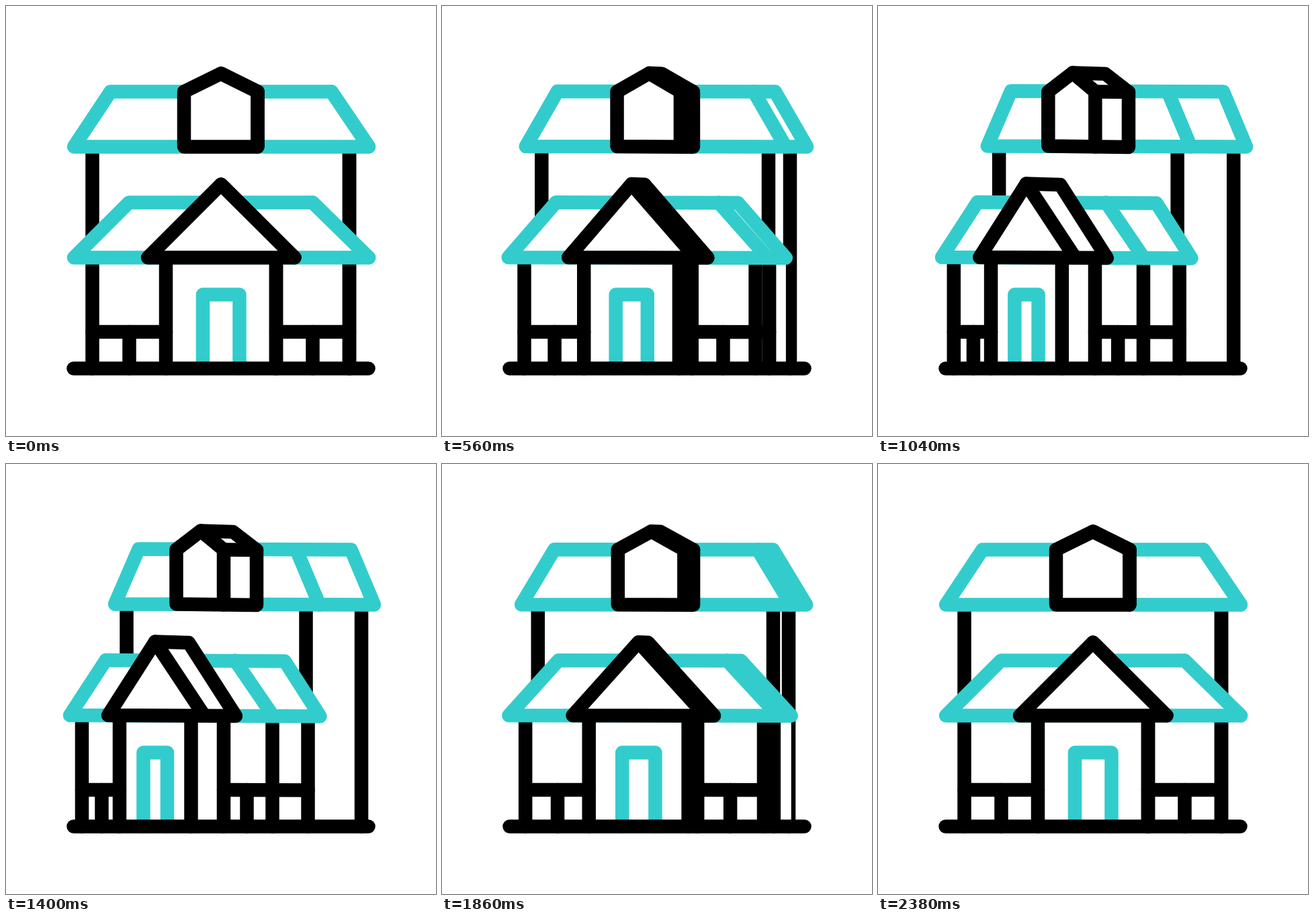
Animation of 640 by 640 pixels, one loop 2400 ms. Source, as an HTML page with a canvas:

```html
<!DOCTYPE html>
<html lang="en">
<head>
<meta charset="utf-8">
<title>Turning house</title>
<style>
  html, body { margin: 0; width: 100%; height: 100%; overflow: hidden; background: #fff; }
  canvas { display: block; }
</style>
</head>
<body>
<canvas id="stage" width="640" height="640"></canvas>
<script>
const ctx = document.getElementById('stage').getContext('2d');
const TEAL = '#33cccc', BLACK = '#000';
const LOOP = 2400, HALF = 1190;
const FLOOR = 539.5, EAVES = 374.5, RAIL = 485;
let turn = 0;

// Symmetric ease: time runs along a cubic with handles A and B
function ease(x) {
  const A = 0.765, B = 0.24;
  let lo = 0, hi = 1;
  for (let i = 0; i < 30; i++) {
    const s = (lo + hi) / 2, r = 1 - s;
    if (3 * s * r * r * A + 3 * s * s * r * B + s ** 3 < x) lo = s; else hi = s;
  }
  return lo * lo * (3 - 2 * lo);
}

// A point of the front view and its shift when the house turns
const pt = (x, y, dx = 0, dy = 0) => [x + dx * turn, y + dy * turn];

function trace(points) {
  ctx.beginPath();
  points.forEach(p => ctx.lineTo(...p));
}

function line(color, ...points) {
  trace(points);
  ctx.strokeStyle = color;
  ctx.stroke();
}

function shape(color, ...points) {
  trace(points);
  ctx.closePath();
  ctx.fill();
  ctx.strokeStyle = color;
  ctx.stroke();
}

const post = (x, dx, top, bottom = FLOOR) =>
  line(BLACK, pt(x, top, dx), pt(x, bottom, dx));

function upperFloor() {
  post(128.5, 51, 209.5, EAVES);
  post(511, -64.5, 209.5, EAVES);
  post(511, 18, 209.5);

  shape(TEAL, pt(101, 209.5, 61, -1), pt(155.5, 127.5, 42, -1),
    pt(484.5, 127.5, 29), pt(540, 209.5, 8));
  line(TEAL, pt(484.5, 127.5, -52.5), pt(540, 209.5, -73.5));

  const apex = pt(320, 100.5, -30, -1), backApex = pt(320, 100.5, 18, 0.5);
  const left = pt(265, 209.5, -11.5, -1), leftTop = pt(265, 127.5, -11.5);
  const right = pt(374.5, 209.5, -50.5), rightTop = pt(374.5, 127.5, -50.5);
  const back = pt(374.5, 209.5, -1.5, 0.5), backTop = pt(374.5, 127.5, -1.5, 0.5);
  shape(BLACK, left, leftTop, apex, backApex, backTop, back);
  line(BLACK, apex, rightTop, right);
  line(BLACK, rightTop, backTop);
}

function lowerFloor() {
  const left = pt(101, EAVES, -6, -0.5), right = pt(540, EAVES, -72.5, 1);
  trace([left, right, [right[0], FLOOR], [left[0], FLOOR]]);
  ctx.fill();

  post(128.5, -15.5, EAVES);
  post(511, -114.5, EAVES);
  post(511, -61.5, EAVES);
  post(183.5, -41, RAIL);
  post(456.5, -98, RAIL);
  line(BLACK, pt(128.5, RAIL, -15.5), pt(238, RAIL, -69));
  line(BLACK, pt(402, RAIL, -78), pt(511, RAIL, -61.5, 0.5));

  shape(TEAL, left, pt(183, 292.5, -34.5, -0.5), pt(456.5, 292.5, -41.5, 1), right);
  line(TEAL, pt(456.5, 292.5, -115.5), pt(540, EAVES, -142.5, 0.5));
}

function porch() {
  post(238, -69, EAVES);
  post(402, -126.5, EAVES);
  post(402, -78, EAVES);
  line(TEAL, pt(293, FLOOR, -88.5), pt(293, 429.5, -88.5),
    pt(347.5, 429.5, -107.5), pt(347.5, FLOOR, -107.5));

  const apex = pt(320, 265.5, -98, -1);
  shape(BLACK, pt(211, EAVES, -59, -0.5), apex,
    pt(320, 265.5, -48, 0.5), pt(429.5, EAVES, -87.5, 0.5));
  line(BLACK, apex, pt(429.5, EAVES, -134.5));
}

function draw(now) {
  const t = now % LOOP;
  turn = 1.024 * ease(Math.max(0, 1 - Math.abs(t - HALF) / HALF));
  ctx.fillStyle = '#fff';
  ctx.fillRect(0, 0, 640, 640);
  ctx.lineWidth = 20.5;
  ctx.lineCap = ctx.lineJoin = 'round';
  upperFloor();
  lowerFloor();
  porch();
  line(BLACK, [100.5, FLOOR], [539.5, FLOOR]);
  requestAnimationFrame(draw);
}
requestAnimationFrame(draw);
</script>
</body>
</html>
```
